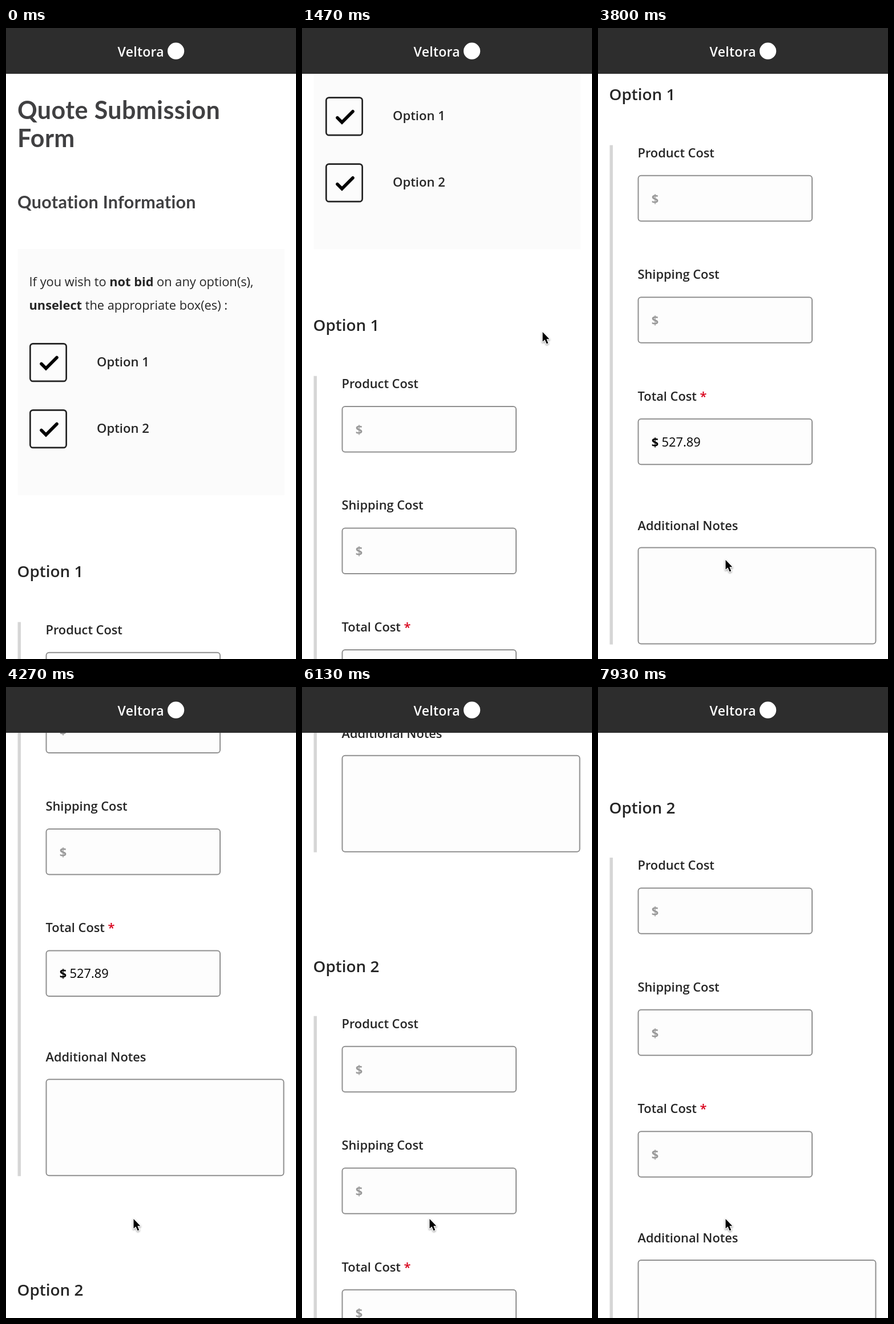
An HTML page with a canvas that plays this animation: 508x1102 px, repeating every 8000 ms.

```html
<!DOCTYPE html>
<html lang="en">
<head>
<meta charset="utf-8">
<title>Quote Submission Form</title>
<style>
  html, body { margin: 0; width: 100%; height: 100%; overflow: hidden; background: #fff; }
  canvas { display: block; width: 508px; height: 1102px; }
</style>
</head>
<body>
<canvas id="stage" width="508" height="1102"></canvas>
<script>
const W = 508, H = 1102, LOOP = 8000, FPS = 15, HEADER = 80;
const ctx = document.getElementById('stage').getContext('2d');
const SANS = '"Open Sans", "Noto Sans", sans-serif';
const TITLE = 'Raleway, Lato, sans-serif';
const INK = '#262626', BODY = 21.8;

// Scroll gestures: start ms, end ms, target offset, ease-out power
const scrolls = [
  [667, 1533, 430.5, 2.5],
  [1533, 2000, 621, 2],
  [3667, 4333, 1055.7, 3],
  [4667, 5400, 1518, 1.96],
  [5933, 6267, 1680, 1.1],
  [7333, 7933, 1897.5, 2]
];

const easeOut = (u, p) => 1 - Math.pow(1 - Math.min(1, Math.max(0, u)), p);

function scrollAt(t) {
  let y = 0;
  for (const [a, b, to, p] of scrolls) {
    if (t <= a) break;
    y += (to - y) * easeOut((t - a) / (b - a), p);
  }
  return y;
}

function cursorAt(t) {
  if (t < 199) return null;
  if (t < 265) return [440, 521];
  const e = easeOut((t - 2333) / 600, 1.5);
  const curve = (a, b, c) => (1 - e) * (1 - e) * a + 2 * e * (1 - e) * b + e * e * c;
  return [curve(421.5, 376, 223.5), curve(531, 682, 929)];
}

function text(str, x, y, size = BODY, weight = 600, color = INK, family = SANS, spacing = 0) {
  ctx.font = `${weight} ${size}px ${family}`;
  ctx.letterSpacing = spacing + 'px';
  ctx.fillStyle = color;
  ctx.fillText(str, x, y);
  return x + ctx.measureText(str).width;
}

function frame(x, y, w, h, line, radius, color, fill) {
  const half = line / 2;
  ctx.beginPath();
  ctx.roundRect(x + half, y + half, w - line, h - line, radius);
  ctx.fillStyle = fill;
  ctx.fill();
  ctx.lineWidth = line;
  ctx.strokeStyle = color;
  ctx.stroke();
}

function checkbox(y, label) {
  frame(41, y, 66, 68.3, 2.7, 5, '#222', '#fcfcfc');
  ctx.beginPath();
  ctx.moveTo(62, y + 36.5);
  ctx.lineTo(70, y + 44.5);
  ctx.lineTo(89, y + 25.5);
  ctx.lineWidth = 5.6;
  ctx.lineCap = 'round';
  ctx.lineJoin = 'miter';
  ctx.strokeStyle = '#000';
  ctx.stroke();
  text(label, 159, y + 41, 22.1);
}

const inputBox = (y, w, h) => frame(69.5, y, w, h, 2, 5, '#909090', '#fdfdfd');

function moneyField(y, label, required, value) {
  const end = text(label, 69.5, y);
  if (required) text(' *', end, y, BODY, 600, '#d9001b');
  inputBox(y + 31.2, 306.5, 81.5);
  text('$', 93.7, y + 80, BODY, 700, value ? '#000' : '#999');
  if (value) text(value, 111.6, y + 80, BODY, 400, '#000');
}

function section(top, title, titleY, total) {
  text(title, 19.5, titleY, 27.9);
  ctx.fillStyle = '#d6d6d6';
  ctx.fillRect(20.5, top, 5.5, 872);
  const y = top + 21;
  moneyField(y, 'Product Cost');
  moneyField(y + 212.5, 'Shipping Cost');
  moneyField(y + 425, 'Total Cost', true, total);
  text('Additional Notes', 69.5, y + 651);
  inputBox(top + 702, 418, 170);
}

function page(t) {
  const heading = '#404042';
  text('Quote Submission', 20, 158.5, 43, 700, heading, TITLE, 0.4);
  text('Form', 20, 207.5, 43, 700, heading, TITLE, 0.4);
  text('Quotation Information', 20, 314.5, 30.5, 700, heading, TITLE, 0.3);

  ctx.fillStyle = '#fbfbfb';
  ctx.fillRect(20.5, 386, 467.5, 430);
  let x = text('If you wish to ', 40.5, 451, BODY, 400);
  x = text('not bid', x, 451, BODY, 700);
  text(' on any option(s),', x, 451, BODY, 400);
  x = text('unselect', 40.5, 491.5, BODY, 700);
  text(' the appropriate box(es) :', x, 491.5, BODY, 400);
  checkbox(550, 'Option 1');
  checkbox(666, 'Option 2');

  section(1037.5, 'Option 1', 959, t > 3460 ? '527.89' : '');
  section(2195.5, 'Option 2', 2118.5, '');
}

function header() {
  ctx.fillStyle = '#2d2d2d';
  ctx.fillRect(0, 0, W, HEADER);
  text('Veltora', 195.5, 49.5, 23, 600, '#fff', SANS, 0.3);
  ctx.beginPath();
  ctx.arc(297.6, 40.2, 14.6, 0, Math.PI * 2);
  ctx.fillStyle = '#fff';
  ctx.fill();
}

function cursor([x, y]) {
  const shape = [[0, 0], [0, 16.8], [3.9, 13.2], [7, 20.4], [9.7, 19.3], [6.8, 12.2], [11.8, 12.2]];
  ctx.save();
  ctx.translate(x, y);
  ctx.beginPath();
  shape.forEach(([px, py]) => ctx.lineTo(px, py));
  ctx.closePath();
  ctx.lineJoin = 'round';
  ctx.lineWidth = 2.6;
  ctx.strokeStyle = '#fff';
  ctx.shadowColor = 'rgba(0,0,0,0.4)';
  ctx.shadowBlur = 3;
  ctx.shadowOffsetY = 1.5;
  ctx.stroke();
  ctx.shadowColor = 'transparent';
  ctx.fillStyle = '#000';
  ctx.fill();
  ctx.restore();
}

function draw(t) {
  ctx.fillStyle = '#fff';
  ctx.fillRect(0, 0, W, H);
  ctx.save();
  ctx.translate(0, -scrollAt(t));
  page(t);
  ctx.restore();
  header();
  const pos = cursorAt(t);
  if (pos) cursor(pos);
}

const start = performance.now();
function tick() {
  const ms = Math.max(0, performance.now() - start) % LOOP;
  const step = Math.min(LOOP * FPS / 1000 - 1, Math.floor((ms + 4) * FPS / 1000));
  draw(step * 1000 / FPS);
  requestAnimationFrame(tick);
}
tick();
</script>
</body>
</html>
```
